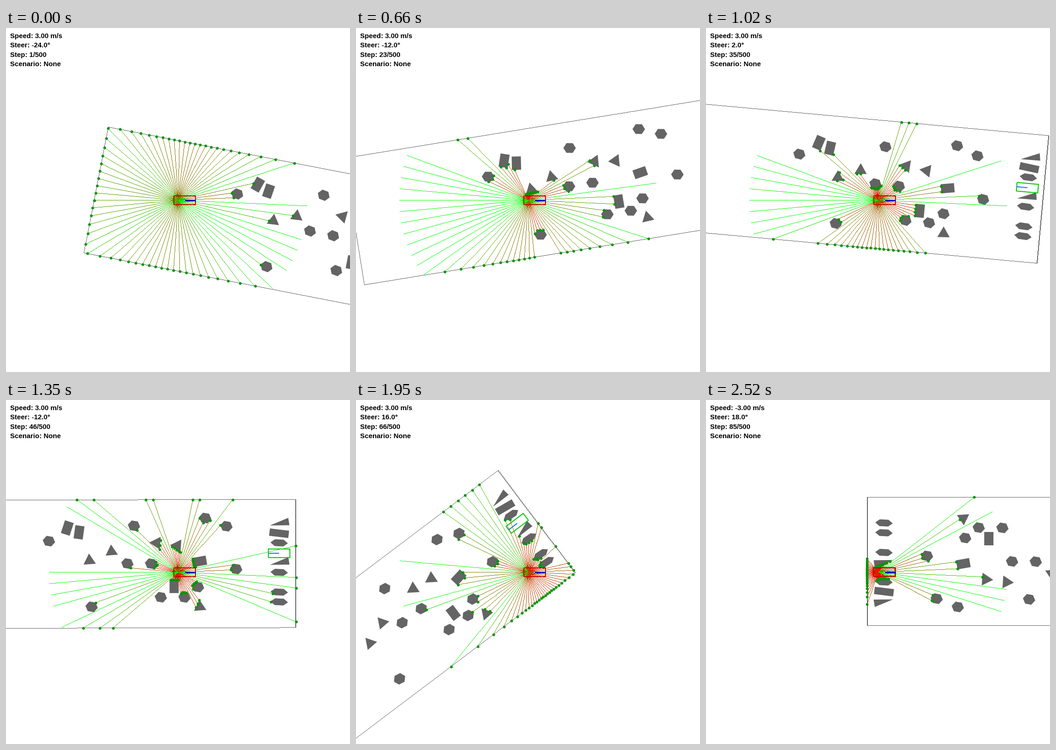
A matplotlib script for the animation above (2.55 s loop, 748 by 748 pixels).

```python
import numpy as np
import matplotlib.pyplot as plt
from matplotlib.animation import FuncAnimation
from matplotlib.collections import LineCollection, PolyCollection

SIZE, DPI, FRAMES = 748, 100, 85
PX = 72 / DPI                      # one pixel in points
SCALE = SIZE / 80                  # pixels per metre, one metre per step
RANGE = 30 * SCALE
CAR = 5 * SCALE, 2 * SCALE
MID = SIZE / 2 + 0.5
LOT_W, LOT_H = 840, 278.7


def spin(points, deg):
    c, s = np.cos(np.radians(deg)), np.sin(np.radians(deg))
    return np.asarray(points, float) @ np.array([[c, s], [-s, c]])


def ngon(n, x, y, rx, ry, tilt):
    t = np.arange(n) * 2 * np.pi / n
    return spin(np.column_stack([rx * np.cos(t), ry * np.sin(t)]), tilt) + (x, y)


def box(x, y, w, h, tilt=0):
    corners = np.array([(-1, -1), (1, -1), (1, 1), (-1, 1)]) / 2
    return spin(corners * (w, h), tilt) + (x, y)


# ---------- the lot, in pixels from its top left corner ----------
hex_spots = [(303, 89.5), (488, 56.5), (473.5, 138.5), (525, 139),
             (395.5, 232.5), (546, 212), (597.5, 212.5), (627, 190),
             (710, 151), (643, 40), (689, 58)]
up_spots = [(391, 132), (439, 112.5), (631, 233)]
left_spots = [(537, 94), (582, 100)]
box_spots = [(343, 61, 18), (368.5, 70.5, 8), (631, 134, 80), (575, 188.5, 0)]

obstacles = [ngon(6, x, y, 13.6, 12.2, 10) for x, y in hex_spots]
obstacles += [ngon(3, x, y, 15.5, 15.5, 26) for x, y in up_spots]
obstacles += [ngon(3, x, y, 16, 16, 64) for x, y in left_spots]
obstacles += [box(x, y, 20, 29, tilt) for x, y, tilt in box_spots]

# parking row: triangle, box, hexagon, goal or free space
ROW_X = 803.5
for slot, kind in enumerate("tbhgth hh"):
    y = 52 + 21.4 * slot
    if kind == "t":
        obstacles.append(np.array([(-20, 4.5), (20, -12), (22.5, 4)]) + (ROW_X, y))
    elif kind == "b":
        obstacles.append(box(ROW_X, y, 42, 16, 7))
    elif kind == "h":
        obstacles.append(ngon(6, ROW_X, y - 0.5, 19, 8.5, 3))
    elif kind == "g":
        goal = box(ROW_X, y + 0.8, *CAR)
        goal_nose = np.array([(ROW_X, y + 0.8), (ROW_X - CAR[0] / 2, y + 0.8)])

lot = np.array([(0, 0), (LOT_W, 0), (LOT_W, LOT_H), (0, LOT_H)], float)
shapes = obstacles + [lot]
seg_a = np.concatenate(shapes)
seg_b = np.concatenate([np.roll(s, -1, axis=0) for s in shapes])

# ---------- the drive: smooth curves through a few poses ----------
SWITCH = 67                        # last step in forward gear
poses = np.array([                 # step, x, y, heading, steer
    (0, 179.5, 127.3, -10.97, -24), (22, 381, 154.2, 9.22, -12),
    (34, 483, 173.7, -5.23, 2), (45, 584, 157.7, 0.13, -12),
    (57, 693, 179.7, 21, 12), (SWITCH, 773, 228, 41, 18),
    (73, 751, 180, 90, 18), (84, 816, 115.5, 180, 18)])
when = poses[:, 0]


def drive(i):
    """Position, heading and gear on the Hermite curve at step i."""
    k = max(np.searchsorted(when, i) - 1, 0)
    span = when[k + 1] - when[k]
    u = (i - when[k]) / span
    gear = 1 if i <= SWITCH else -1
    a, b = poses[k, 1:3], poses[k + 1, 1:3]
    angle = np.radians(poses[k:k + 2, 3])
    ta, tb = gear * SCALE * span * np.column_stack([np.cos(angle), np.sin(angle)])
    bend = 3 * (b - a) - 2 * ta - tb
    curl = 2 * (a - b) + ta + tb
    place = a + u * (ta + u * (bend + u * curl))
    dx, dy = gear * (ta + u * (2 * bend + u * 3 * curl))
    return place, np.degrees(np.arctan2(dy, dx)), gear


# ---------- lidar ----------
beam = np.linspace(-np.pi, np.pi, 72)
beam_dir = np.column_stack([np.cos(beam), np.sin(beam)])


def cross(p, q):
    return p[..., 0] * q[..., 1] - p[..., 1] * q[..., 0]


def scan(a, b):
    """Distance along each beam to the nearest of the segments a-b."""
    edge = b - a
    d = beam_dir[:, None, :]
    den = cross(d, edge[None])
    den = np.where(np.abs(den) < 1e-9, 1e-9, den)
    dist = cross(a, edge)[None] / den
    along = cross(a[None], d) / den
    hit = (dist > 0) & (along >= 0) & (along <= 1)
    return np.where(hit, dist, np.inf).min(axis=1)


# ---------- drawing ----------
fig = plt.figure(figsize=(SIZE / DPI, SIZE / DPI), dpi=DPI, facecolor="white")
ax = fig.add_axes([0, 0, 1, 1])
ax.axis("off")

GREY = (100 / 255,) * 3
RED, BLUE = (0.8, 0, 0), (0, 0, 0.8)


def add(collection, z):
    collection.set_zorder(z)
    return ax.add_collection(collection, autolim=False)


def outline(color, z, verts=()):
    return add(PolyCollection(verts, facecolors="none", edgecolors=[color],
                              linewidths=2 * PX), z)


def stroke(color, width, z, segs=()):
    return add(LineCollection(segs, colors=[color], linewidths=width * PX,
                              capstyle="butt"), z)


def trace(canvas, p, q, color):
    """Hard one-pixel line."""
    n = int(np.abs(q - p).max()) + 2
    x, y = np.floor(np.linspace(p, q, n)).astype(int).T
    seen = (x >= 0) & (x < SIZE) & (y >= 0) & (y < SIZE)
    canvas[y[seen], x[seen]] = (*color, 255)


blocks = add(PolyCollection([], facecolors=[GREY], edgecolors="none"), 1)
goal_box = outline((0, 0.78, 0), 2)
goal_line = stroke((0, 0.47, 1), 2, 2)
layer = ax.imshow(np.zeros((SIZE, SIZE, 4), np.uint8), aspect="auto",
                  extent=(0, SIZE, SIZE, 0), interpolation="nearest", zorder=3)
dots, = ax.plot([], [], "o", color=(0, 150 / 255, 0), ms=6 * PX, mew=0, zorder=4)

centre = MID + 1.5 * SCALE
outline(RED, 5, [box(centre, MID, *CAR)])
stroke(BLUE, 3, 6, [[(centre, MID), (centre + CAR[0] / 2, MID)]])

labels = [ax.text(9, 21.5 + 20.5 * k, "", family="Liberation Sans",
                  weight="bold", size=15 * PX, color="black",
                  va="baseline", zorder=7) for k in range(4)]
ax.set_xlim(0, SIZE)
ax.set_ylim(SIZE, 0)


def draw(i):
    place, heading, gear = drive(i)

    def view(points):
        return spin(points - place, -heading) + MID

    blocks.set_verts([view(p) for p in obstacles])
    goal_box.set_verts([view(goal)])
    goal_line.set_segments([view(goal_nose)])

    canvas = np.zeros((SIZE, SIZE, 4), np.uint8)
    corners = view(lot)
    for p, q in zip(corners, np.roll(corners, -1, axis=0)):
        trace(canvas, p, q, (100, 100, 100))
    # the far wall is two pixels thick
    trace(canvas, *(view(lot[1:3] - (1, 0))), (100, 100, 100))

    dist = scan(view(seg_a) - MID, view(seg_b) - MID)
    reach = np.minimum(dist, RANGE)
    ends = MID + beam_dir * reach[:, None]
    for end, far in zip(ends, reach / RANGE):
        trace(canvas, np.array([MID, MID]), end,
              (int(255 * (1 - far)), int(255 * far), 0))
    layer.set_data(canvas)
    found = ends[dist < RANGE]
    dots.set_data(found[:, 0], found[:, 1])

    steer = 2 * np.round(np.interp(i, when, poses[:, 4]) / 2) + 0.0
    lines = (f"Speed: {3 * gear:.2f} m/s", f"Steer: {steer:.1f}°",
             f"Step: {i + 1}/500", "Scenario: None")
    for label, line in zip(labels, lines):
        label.set_text(line)
    return [blocks, goal_box, goal_line, layer, dots, *labels]


anim = FuncAnimation(fig, draw, frames=FRAMES, interval=30, repeat=True,
                     repeat_delay=0, blit=False)
plt.show()
```
